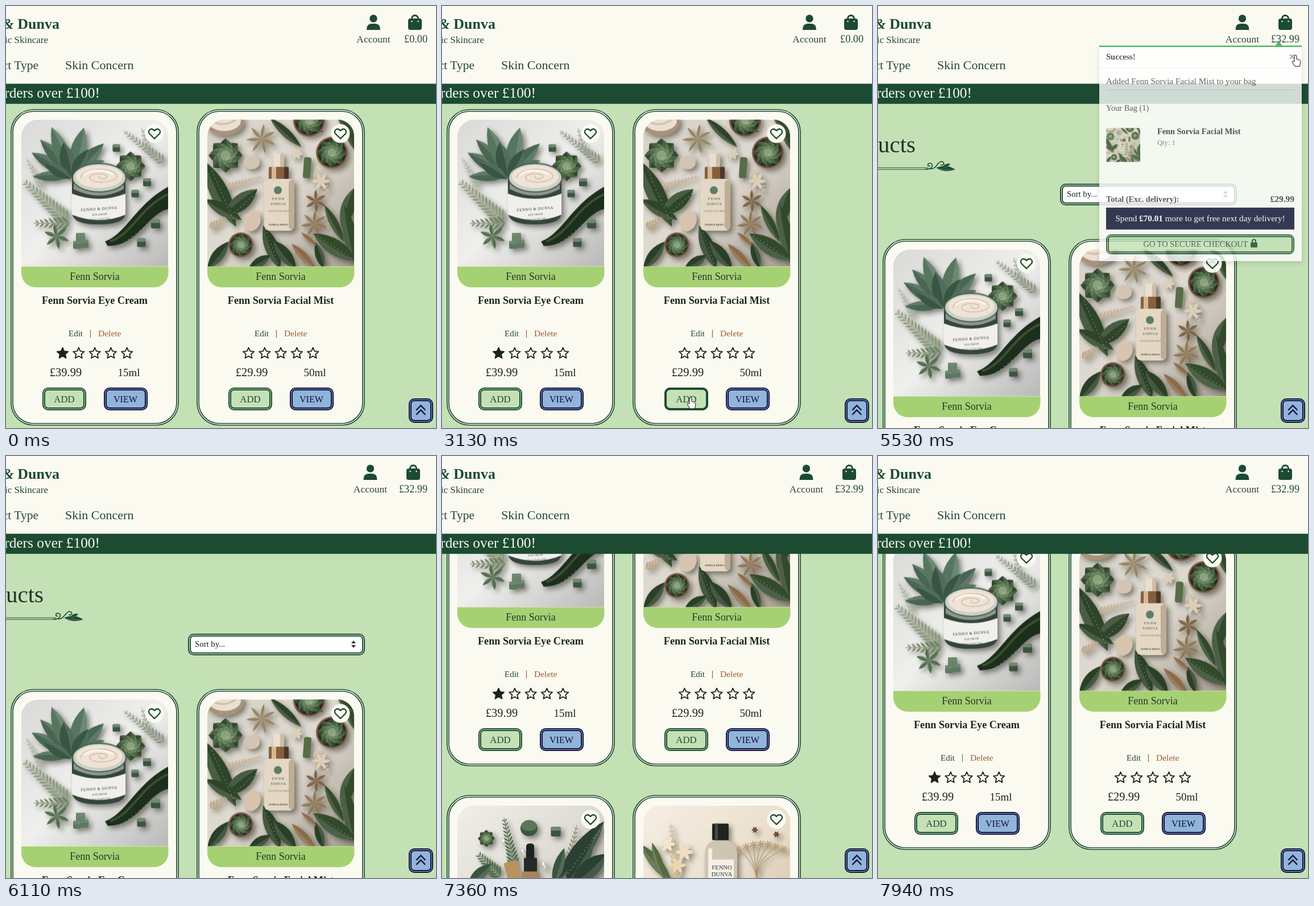
Animation of 756 by 741 pixels, one loop 8 s. Source, as an HTML page:

```html
<!DOCTYPE html>
<html lang="en">
<head>
<meta charset="utf-8">
<title>Skincare shop</title>
<style>
html, body { margin: 0; width: 100%; height: 100%; overflow: hidden; background: #c4e1b5; }
svg { display: block; width: 756px; height: 741px; font-family: "Liberation Serif", serif; }
.anim { animation: 8s step-end infinite; }
#page { animation-name: scroll; }
#before { animation-name: before; }
#after { animation-name: after; }
#toast { animation-name: toast; }
#addHover { animation-name: addHover; }
#viewHover { animation-name: viewHover; }
#cursor { animation-name: move, shown; }
#hand { animation-name: hand; }
#arrow { animation-name: arrow; }

@keyframes scroll {
  0% { transform: translateY(-228px); }
  45.25% { transform: translateY(0); }
  85.875% { transform: translateY(-25px); }
  86.875% { transform: translateY(-125px); }
  88% { transform: translateY(-235px); }
  88.875% { transform: translateY(-310px); }
  90% { transform: translateY(-370px); }
  91% { transform: translateY(-405px); }
  92% { transform: translateY(-420px); }
  94% { transform: translateY(-412px); }
  95.1% { transform: translateY(-390px); }
  96.1% { transform: translateY(-357px); }
  97.2% { transform: translateY(-320px); }
  98.2% { transform: translateY(-290px); }
  99.25%, 100% { transform: translateY(-273px); }
}
@keyframes before { 0% { opacity: 1; } 45.25%, 100% { opacity: 0; } }
@keyframes after { 0% { opacity: 0; } 45.25%, 100% { opacity: 1; } }
@keyframes toast {
  0% { opacity: 0; } 46.25% { opacity: .5; } 47.25% { opacity: 1; }
  69.125% { opacity: .8; } 70.125% { opacity: .35; } 71.375%, 100% { opacity: 0; }
}
@keyframes addHover {
  0% { opacity: 0; } 16.8% { opacity: 1; } 21.5% { opacity: 0; }
  31.3% { opacity: 1; } 45.25%, 100% { opacity: 0; }
}
@keyframes viewHover { 0% { opacity: 0; } 22.75% { opacity: 1; } 28.2%, 100% { opacity: 0; } }
@keyframes shown { 0% { opacity: 0; } 8.25% { opacity: 1; } 76.375%, 100% { opacity: 0; } }
@keyframes hand {
  0% { opacity: 0; } 16.8% { opacity: 1; } 21.5% { opacity: 0; } 22.75% { opacity: 1; }
  28.2% { opacity: 0; } 31.3% { opacity: 1; } 51.5% { opacity: 0; } 68.1% { opacity: 1; }
  70.125%, 100% { opacity: 0; }
}
@keyframes arrow {
  0% { opacity: 1; } 16.8% { opacity: 0; } 21.5% { opacity: 1; } 22.75% { opacity: 0; }
  28.2% { opacity: 1; } 31.3% { opacity: 0; } 51.5% { opacity: 1; } 68.1% { opacity: 0; }
  70.125%, 100% { opacity: 1; }
}
@keyframes move {
  0%, 8.25% { transform: translate(661px, 630px); animation-timing-function: steps(3); }
  11.5% { transform: translate(560px, 665px); animation-timing-function: steps(6); }
  17.875%, 19% { transform: translate(431px, 681px); animation-timing-function: steps(4); }
  24% { transform: translate(540px, 689px); animation-timing-function: steps(5); }
  29.25% { transform: translate(482px, 684px); animation-timing-function: steps(5); }
  34.375%, 36% { transform: translate(431px, 680px); animation-timing-function: steps(2); }
  39.125%, 50.5% { transform: translate(437px, 687px); animation-timing-function: steps(4); }
  54.625%, 58.875% { transform: translate(743px, 139px); animation-timing-function: steps(10); }
  69.125% { transform: translate(734px, 86px); }
  75.75%, 100% { transform: translate(739px, 88px); }
}
</style>
</head>
<body>
<script>
const GREEN = '#1c4b32', NAVY = '#11103a', CREAM = '#fbfaf0', MINT = '#c4e1b5', BLUE = '#91b4da', INK = '#18251f';
const range = n => [...Array(n).keys()];

const text = (x, y, size, str, fill = INK, anchor = 'start', extra = '') =>
  `<text x="${x}" y="${y}" font-size="${size}" fill="${fill}" text-anchor="${anchor}" ${extra}>${str}</text>`;
const bold = 'font-weight="bold"';
const shape = (d, fill, extra = '') => `<path d="${d}" fill="${fill}" ${extra}/>`;
const line = (d, color, width, extra = '') =>
  `<path d="${d}" fill="none" stroke="${color}" stroke-width="${width}" stroke-linecap="round" ${extra}/>`;
const rect = (x, y, w, h, fill, r = 0, extra = '') =>
  `<rect x="${x}" y="${y}" width="${w}" height="${h}" rx="${r}" fill="${fill}" ${extra}/>`;
const oval = (x, y, rx, ry, fill, extra = '') => `<ellipse cx="${x}" cy="${y}" rx="${rx}" ry="${ry}" fill="${fill}" ${extra}/>`;
const at = (x, y, body, extra = '') => `<g transform="translate(${x} ${y}) ${extra}">${body}</g>`;

// Rounded box with a double outline
function box(x, y, w, h, r, fill, color, width = 2) {
  const ring = (inset, f) => rect(x + inset, y + inset, w - 2 * inset, h - 2 * inset, f, r - inset,
    `stroke="${color}" stroke-width="${width}"`);
  return ring(1, fill) + ring(4, 'none');
}
const solidBox = (x, y, w, h, r, fill, color) =>
  rect(x + 2, y + 2, w - 4, h - 4, fill, r - 2, `stroke="${color}" stroke-width="4"`);

// ---- plants ----
function leaf(x, y, X, Y, w, fill) {
  const len = Math.hypot(X - x, Y - y), nx = (y - Y) / len * w, ny = (X - x) / len * w;
  const mx = (x + X) / 2, my = (y + Y) / 2;
  const side = k => `${mx + nx * k} ${my + ny * k}`;
  return shape(`M${x} ${y}Q${side(1)} ${X} ${Y}Q${side(-1)} ${x} ${y}`, fill) +
    shape(`M${x} ${y}Q${side(1)} ${X} ${Y}Q${side(.2)} ${x} ${y}`, '#fff', 'opacity=".13"');
}
const leaves = (list, fill) => list.map(l => leaf(...l, fill)).join('');
function burst(x, y, r, n, w, fill, turn = 0) {
  return range(n).map(i => {
    const a = turn + i * 2 * Math.PI / n;
    return leaf(x, y, x + r * Math.cos(a), y + r * Math.sin(a), w, fill);
  }).join('');
}
const rosette = (x, y, r) => ['#34492f', '#4c6845', '#66825c', '#8aa27c'].map((c, i) =>
  burst(x, y, r * (1 - i * .23), 8, r * (.75 - i * .13), c, i * .4)).join('');
const pot = (x, y, r) => oval(x, y, r + 1, r + 1, '#7d5c43') + oval(x, y, r - 2, r - 2, '#2a251e') + rosette(x, y, r - 1);
function sprig(x, y, X, Y, n, size, fill) {
  const a = Math.atan2(Y - y, X - x);
  return line(`M${x} ${y}L${X} ${Y}`, fill, 1) + range(n).map(i => {
    const k = i / n, px = x + (X - x) * k, py = y + (Y - y) * k, s = size * (1.1 - k * .7);
    return [-.75, .75].map(d => leaf(px, py, px + s * Math.cos(a + d), py + s * Math.sin(a + d), s * .28, fill)).join('');
  }).join('');
}
const cube = (x, y, s, fill = '#3a5240') => rect(x - s / 2, y - s / 2, s, s, fill, 2) +
  rect(x - s / 2, y - s / 2, s, s * .4, '#71876f', 2);
const spikes = (x, y, X, Y, n) => line(`M${x} ${y}L${X} ${Y}`, '#8fa276', 1.1, `stroke-dasharray="1 ${n}"`);

// ---- product photos, 258 x 258 ----
const fade = (id, a, b, c) => `<linearGradient id="${id}" x1="0" y1="0" x2="1" y2="1"><stop stop-color="${a}"/>
  <stop offset=".5" stop-color="${b}"/><stop offset="1" stop-color="${c}"/></linearGradient>`;
const photo = (backdrop, ...parts) => rect(0, 0, 258, 258, `url(#${backdrop})`) +
  `<g clip-path="url(#frame)"><g filter="url(#cast)">${parts.join('')}</g></g>`;

const jarPhoto = () => photo('grey',
  sprig(36, 118, 9, 68, 8, 10, '#a3ad93'), sprig(250, 74, 180, 20, 12, 13, '#87947c'),
  sprig(225, 60, 212, 15, 6, 10, '#96a28b'),
  leaves([[88, 98, 18, 58, 22], [88, 98, 20, 100, 18], [88, 98, 145, 42, 24], [90, 95, 33, 35, 22]], '#496653'),
  leaves([[88, 98, 53, 13, 26], [90, 98, 110, 14, 28], [88, 98, 146, 72, 22]], '#56765f'),
  leaves([[88, 102, 74, 40, 26], [88, 102, 118, 52, 22], [88, 104, 40, 75, 20]], '#375643'),
  rosette(192, 82, 26),
  sprig(82, 178, 4, 108, 13, 20, '#8c9a7b'), sprig(84, 182, 22, 182, 7, 17, '#6b815f'),
  cube(167, 50, 13), cube(221, 110, 14), cube(200, 130, 13), cube(236, 183, 16), cube(211, 216, 15),
  cube(98, 220, 14, '#5c7862'), cube(111, 218, 14, '#5c7862'), cube(104, 207, 16, '#67836a'),
  burst(62, 205, 23, 6, 7, '#506c4b', .35),
  shape('M147 214C185 200 200 150 258 118V157C222 165 205 222 152 222Z', '#1f2d1c'),
  line('M158 213C196 200 208 155 256 132', '#3c5132', 4), spikes(176, 220, 252, 160, 7),
  shape('M89 100V165Q92 185 137 184Q182 184 183 165V100Z', '#35453a'),
  shape('M92 104V122Q137 145 180 122V104Z', '#8b978a'),
  shape('M89 130Q137 148 183 130V167Q137 186 89 167Z', '#f0efeb'),
  oval(137, 102, 47, 25, '#c9d0c7', 'stroke="#4c5b4f" stroke-width="2"'), oval(137, 100, 41, 20, '#efe3d5'),
  line('M104 102C110 84 160 82 168 98C170 112 118 114 120 101C124 92 154 94 150 101C146 106 134 104 137 99', '#d5c4b3', 2),
  line('M110 97C124 86 150 88 160 96', '#fffaf2', 3),
  at(137, 159, text(0, 0, 7, 'FENNO &amp; DUNVA', '#333', 'middle', 'letter-spacing=".6"') +
    text(0, 9, 4.5, 'EYE CREAM', '#333', 'middle') + text(0, 17, 4, 'FOR A CALM GAZE', '#444', 'middle'), 'rotate(-4)'));

const mistPhoto = () => photo('sand',
  oval(30, 4, 34, 24, '#a9927a'), oval(30, 2, 29, 18, '#eadfd2'), line('M8 2Q28 15 50 0', '#cfbda9', 3),
  leaves([[110, -3, 165, 48, 15], [146, -5, 204, 22, 14]], '#2d4329'), pot(179, 2, 27), pot(219, 58, 27),
  leaves([[240, -5, 260, 55, 14], [228, -5, 258, 22, 12]], '#304829'),
  rosette(32, 63, 30),
  burst(95, 34, 27, 7, 6, '#94825f', .4), burst(157, 60, 11, 6, 5, '#dccdb4'),
  oval(78, 75, 14, 12, '#d3c5b3'),
  sprig(18, 123, 96, 100, 13, 10, '#c4a886'),
  rect(169, 66, 13, 37, '#566d45', 4, 'transform="rotate(4 176 84)"'),
  leaves([[-6, 72, 50, 188, 32], [88, 122, 30, 168, 28], [-4, 140, 60, 176, 22]], '#2e4529'),
  spikes(8, 90, 48, 180, 6), spikes(85, 130, 42, 168, 6),
  sprig(5, 190, 34, 172, 6, 11, '#b99c78'), oval(79, 178, 14, 18, '#d8c4ae', 'transform="rotate(20 79 178)"'),
  sprig(190, 90, 214, 128, 6, 12, '#d2c0a3'), burst(200, 108, 16, 6, 6, '#dccdb3'),
  burst(191, 143, 20, 6, 6, '#7d5f40', .5), burst(188, 183, 24, 7, 6, '#8f7552', .3),
  leaves([[258, 120, 236, 190, 24], [240, 150, 262, 258, 24], [186, 200, 262, 248, 28], [206, 150, 240, 215, 15]], '#304a2b'),
  spikes(194, 204, 256, 245, 6),
  leaves([[98, 186, 128, 262, 24], [116, 212, 156, 262, 22], [0, 262, 38, 214, 20], [205, 262, 190, 215, 15], [72, 262, 112, 238, 17]], '#2a4026'),
  spikes(102, 192, 126, 256, 6), leaves([[148, 218, 190, 262, 14], [165, 198, 192, 222, 8]], '#8a6a47'), pot(59, 220, 21),
  rect(116, 60, 19, 28, '#eadfce', 3), rect(128, 60, 7, 28, '#cbbda9', 3),
  rect(108, 83, 35, 23, '#84603f', 2), rect(113, 83, 8, 23, '#d8b78e'), rect(135, 83, 8, 23, '#4d3726', 2),
  rect(100, 104, 53, 91, '#e4d7c4', 9), rect(143, 106, 10, 87, '#bfad95', 6),
  oval(124, 124, 7, 7, '#5d7c65'),
  text(125, 141, 7, 'FENN', '#355245', 'middle', 'letter-spacing="1"'),
  text(125, 150, 6.5, 'SORVIA', '#355245', 'middle', 'letter-spacing=".6"'),
  text(125, 162, 4, 'CALM FACIAL MIST', '#6a6a5c', 'middle'),
  text(125, 186, 4, 'FENNO &amp; DUNVA', '#333', 'middle', bold));

const serumPhoto = () => photo('shade',
  sprig(100, 105, 82, 22, 12, 15, '#4f6a4a'), sprig(75, 125, 36, 85, 9, 18, '#526c4c'),
  sprig(195, 105, 210, 35, 9, 12, '#88856a'), rosette(51, 58, 15),
  oval(126, 40, 15, 14, '#3a5542'), oval(126, 36, 14, 9, '#5c7759'), cube(173, 46, 17),
  range(9).map(i => oval(80 + i * 37 % 75, 62 + i * 23 % 48, 3, 4, '#fff', 'stroke="#999" opacity=".7"')).join(''),
  leaves([[176, 132, 258, 28, 30], [190, 140, 240, 58, 28], [200, 140, 262, 85, 32]], '#2b4033'),
  leaves([[168, 140, 188, 75, 18], [18, 140, 60, 102, 20]], '#38543e'), spikes(190, 125, 250, 45, 6),
  rect(121, 67, 14, 30, '#1c2020', 5), rect(117, 92, 23, 28, '#252928', 2), rect(114, 116, 29, 20, '#a7845c'),
  rect(85, 98, 24, 32, '#b9925f', 3, 'transform="rotate(-15 97 114)"'));

const tonerPhoto = () => photo('warm',
  sprig(60, 128, 48, 32, 12, 14, '#cfb88f'), burst(42, 68, 14, 6, 7, '#f2e4c8'), burst(72, 82, 16, 6, 7, '#efdfbe'),
  burst(60, 105, 15, 6, 7, '#e9d5ad'), leaves([[-5, 68, 50, 135, 20], [15, 65, 38, 132, 14]], '#566a41'),
  range(7).map(i => {
    const x = 168 + i * 13, y = 78 - 10 * Math.sin(i * .52);
    return line(`M200 130Q196 100 ${x} ${y}`, '#a78a62', 1) + burst(x, y, 8, 7, 2, '#ad9168');
  }).join(''),
  burst(196, 43, 6, 6, 3, '#67432e'), burst(234, 51, 6, 6, 3, '#67432e'),
  shape('M108 130V88Q108 66 124 62H148Q165 66 165 88V130Z', '#cfc5b3'), rect(114, 75, 7, 60, '#f4eee2', 3),
  rect(121, 32, 29, 29, '#22211f', 2), rect(126, 32, 5, 29, '#4a4743'), rect(117, 95, 42, 40, '#f4f0e7'),
  text(138, 112, 10.5, 'FENNO', '#333', 'middle'), text(138, 124, 10.5, 'DUNVA', '#333', 'middle'));

// ---- shop parts ----
const starPath = range(10).map(i => {
  const r = i % 2 ? 4.8 : 10.2, a = i * Math.PI / 5 - Math.PI / 2;
  return `${(r * Math.cos(a)).toFixed(2)} ${(r * Math.sin(a)).toFixed(2)}`;
}).join('L');
const star = (x, y, on) => at(x, y, shape(`M${starPath}Z`, on ? INK : 'none', `stroke="${INK}" stroke-width="1.8" stroke-linejoin="round"`));
const heart = (x, y) => oval(x, y, 16.5, 16.5, CREAM) + at(x, y,
  line('M0 9L-8.6 .5C-13-4.5-6.5-12 0-5C6.5-12 13-4.5 8.6 .5Z', GREEN, 2.3, 'stroke-linejoin="round"'));
const addButton = draw => draw(56, 489, 77, 40, 10, MINT, GREEN) + text(94.5, 514.5, 16.8, 'ADD', '#24463a', 'middle');
const viewButton = draw => draw(164, 489, 77, 40, 10, BLUE, NAVY) + text(202, 514.5, 16.2, 'VIEW', NAVY, 'middle');

function card(x, y, photoId, name, rating, price, volume) {
  return at(x, y, box(0, 0, 296, 556, 40, CREAM, GREEN, 1.7) +
    at(19, 18.5, `<use href="#${photoId}" clip-path="url(#topRound)"/>`) +
    shape('M19 276.5H277.5V288A25 25 0 0 1 252.5 313H44A25 25 0 0 1 19 288Z', '#a6d173') +
    text(148, 300, 18, 'Fenn Sorvia', '#26382c', 'middle') + heart(253, 43) +
    text(148, 342, 18.2, name, INK, 'middle', bold) +
    text(102, 399, 15, 'Edit', '#24463a') + line('M140.5 388V401', '#8a6650', 1.2) + text(154, 399, 15.5, 'Delete', '#9a5b33') +
    range(5).map(i => star(91.5 + i * 28.3, 429, i < rating)).join('') +
    text(97, 469, 20.5, price, INK, 'middle') + text(208, 469, 19, volume, INK, 'middle') +
    addButton(box) + viewButton(box));
}

const account = (x, bagX, total) =>
  oval(x, 22, 6.7, 6.7, GREEN) + shape(`M${x - 12} 42Q${x - 12} 31 ${x - 3} 31H${x + 3}Q${x + 12} 31 ${x + 12} 42Z`, GREEN) +
  rect(bagX - 12, 22, 24, 20, GREEN, 4) + line(`M${bagX - 5.5} 26V22A5.5 5.5 0 0 1 ${bagX + 5.5} 22V26`, GREEN, 3) +
  oval(bagX - 5.5, 27, 1.2, 1.2, CREAM) + oval(bagX + 5.5, 27, 1.2, 1.2, CREAM) +
  text(x, 64, 17.5, 'Account', '#24463a', 'middle') + text(741, 64, 18.2, total, '#24463a', 'end');

const header = rect(0, 0, 756, 137, CREAM) + rect(0, 136.5, 756, 35.3, GREEN) +
  text(94, 40, 26, 'Fenno <tspan font-style="italic">&amp;</tspan> Dunva', GREEN, 'end', bold) +
  text(74, 65, 17, 'Organic Skincare', '#24463a', 'end') +
  text(57, 111, 21.5, 'Product Type', '#24463a', 'end') + text(104, 111, 22, 'Skin Concern', '#24463a') +
  text(165, 161, 25.4, 'Free next day delivery on orders over £100!', CREAM, 'end') +
  `<g id="before" class="anim">${account(646, 719, '£0.00')}</g><g id="after" class="anim">${account(640.5, 716, '£32.99')}</g>`;

const page = text(66, 257, 41, 'Products', '#26302a', 'end') +
  line('M0 284H88M0 287H88', GREEN, 1.2) +
  line('M84 286C96 288 99 276 91 276C86 277 87 282 91 281M92 286C104 286 104 273 112 273C118 274 116 281 111 279', GREEN, 1.7) +
  leaf(102, 284, 136, 287, 9, GREEN) + leaf(113, 284, 127, 277, 6, GREEN) +
  box(320, 312, 311, 38, 10, '#fff', GREEN) + text(332, 335, 14.8, 'Sort by...') +
  shape('M607 329L611 324L615 329ZM607 332L611 337L615 332Z', '#333') +
  card(8, 409, 'jar', 'Fenn Sorvia Eye Cream', 1, '£39.99', '15ml') +
  card(335, 409, 'mist', 'Fenn Sorvia Facial Mist', 0, '£29.99', '50ml') +
  card(8, 1015, 'serum', 'Fenn Sorvia Serum', 0, '£34.99', '30ml') +
  card(335, 1015, 'toner', 'Fenn Sorvia Toner', 0, '£24.99', '100ml') +
  at(335, 409, `<g id="addHover" class="anim">${addButton(solidBox)}</g>
    <g id="viewHover" class="anim">${viewButton(solidBox)}</g>`);

const toast = shape('M698 71L704.5 60L711 71Z', '#28a745') +
  rect(389, 70, 356, 378, '#fff', 0, 'filter="url(#shadow)"') + rect(389, 69.5, 356, 2.5, '#28a745') +
  text(401, 94, 14.6, 'Success!', '#333', 'start', bold) + line('M725 86L731 92M731 86L725 92', '#888', 1.8) +
  rect(389, 109, 356, 1, '#eee') + text(401, 137, 15.2, 'Added Fenn Sorvia Facial Mist to your bag', '#444') +
  rect(401, 147, 331, 1, '#ddd') + text(401, 184, 14.4, 'Your Bag (1)', '#444') +
  at(401, 214, '<use href="#mist" clip-path="url(#thumb)"/>', 'scale(.2326)') +
  text(491, 225, 14.3, 'Fenn Sorvia Facial Mist', '#333', 'start', bold) + text(491, 244, 12.6, 'Qty: 1', '#777') +
  text(401, 344, 14.3, 'Total (Exc. delivery):', '#333', 'start', bold) + text(732, 344, 15.4, '£29.99', '#333', 'end', bold) +
  rect(401, 354, 331, 38.5, NAVY) +
  text(566.5, 378, 15.2, `Spend <tspan ${bold}>£70.01</tspan> more to get free next day delivery!`, '#fff', 'middle') +
  box(401, 401, 331, 35, 9, MINT, GREEN) + text(558.5, 423, 14.4, 'GO TO SECURE CHECKOUT', '#24463a', 'middle') +
  rect(655, 415, 12, 9, GREEN, 1.5) + line('M658 415V413A3 3 0 0 1 664 413V415', GREEN, 2);

const topButton = box(708, 689, 43, 43, 10, BLUE, NAVY) +
  line('M722 709L729.3 701.5L736.6 709M722 717L729.3 709.5L736.6 717', NAVY, 2.4);

const pointer = (id, d) => `<g id="${id}" class="anim">${shape(d, '#fff', 'stroke="#111" stroke-linejoin="round"')}</g>`;
const cursor = pointer('arrow', 'M0 0V15L3.5 11.8L6 17.3L8.6 16.1L6.1 10.8H10.6Z') +
  pointer('hand', 'M-2 2A2 2 0 0 1 2 2V7.5L7.5 9Q9.4 9.8 9 12L7.5 20H-1L-5.3 13Q-6 10 -3.5 10.5L-2 12Z');

const photos = { jar: jarPhoto, mist: mistPhoto, serum: serumPhoto, toner: tonerPhoto };
document.body.innerHTML = `<svg viewBox="0 0 756 741"><defs>
  ${fade('grey', '#d9d9d8', '#efefed', '#b9b9b8')}${fade('sand', '#d6d1c8', '#dfdad1', '#a59c90')}
  ${fade('shade', '#f0eee9', '#dedbd4', '#8f8b83')}${fade('warm', '#f4eee3', '#ebe0cf', '#d0bd9f')}
  <clipPath id="frame"><rect width="258" height="258"/></clipPath>
  <clipPath id="topRound"><path d="M0 258V30A30 30 0 0 1 30 0H228.5A30 30 0 0 1 258.5 30V258Z"/></clipPath>
  <clipPath id="thumb"><rect width="258" height="258" rx="16"/></clipPath>
  <filter id="cast"><feDropShadow dx="5" dy="5" stdDeviation="4" flood-color="#1c1a14" flood-opacity=".5"/></filter>
  <filter id="shadow"><feDropShadow dx="0" dy="4" stdDeviation="5" flood-opacity=".14"/></filter>
  ${Object.entries(photos).map(([id, draw]) => `<g id="${id}">${draw()}</g>`).join('')}
</defs>
${rect(0, 0, 756, 741, MINT)}
<g id="page" class="anim">${page}</g>
${header}${topButton}
<g id="toast" class="anim">${toast}</g>
<g id="cursor" class="anim">${cursor}</g></svg>`;
</script>
</body>
</html>
```
